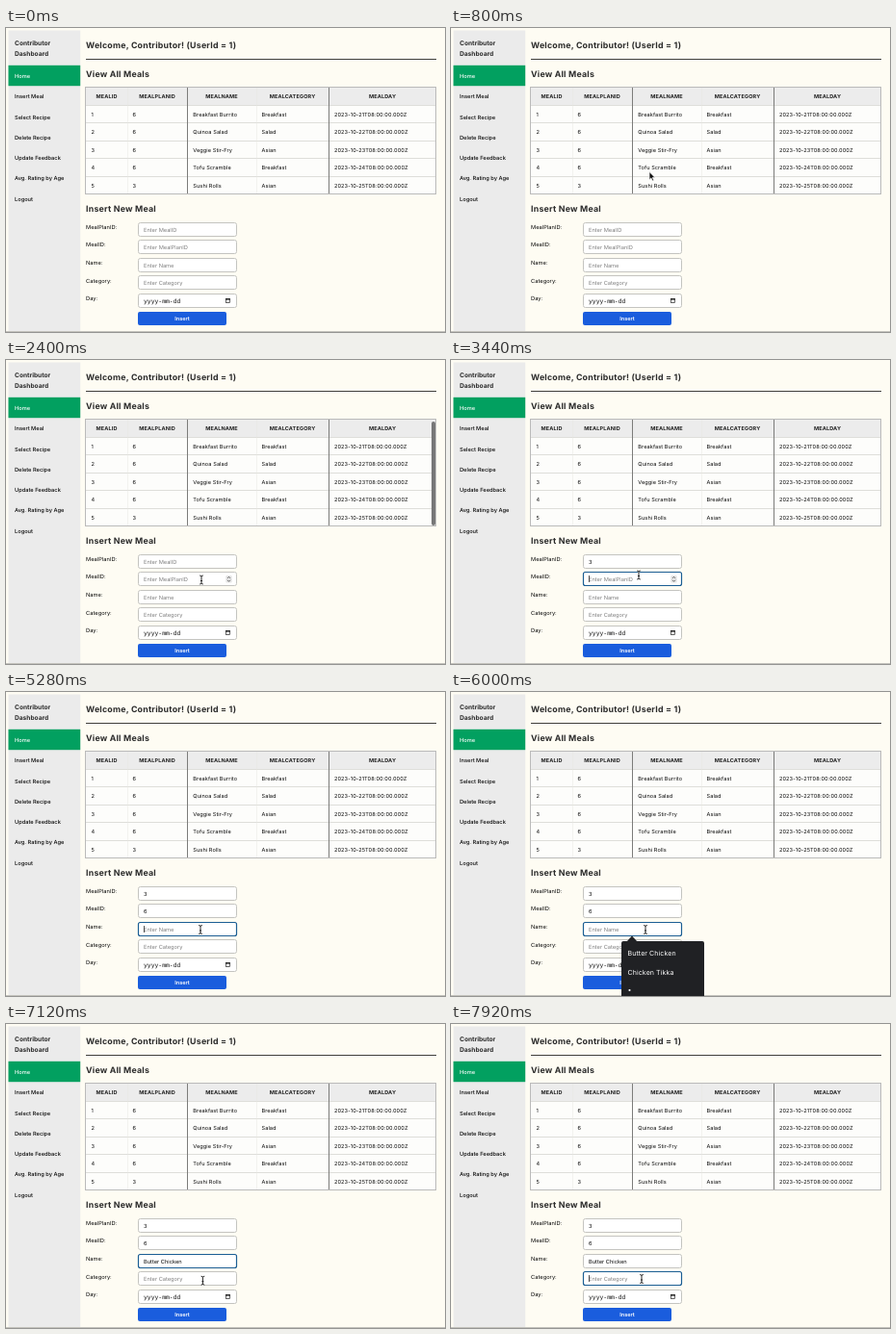
Write an HTML page that moves like this. It is 456x316 px and loops after 8 s.

```html
<!DOCTYPE html>
<html lang="en">
<head>
<meta charset="utf-8">
<title>Contributor Dashboard</title>
<style>
html, body { margin: 0; width: 100%; height: 100%; overflow: hidden; background: #fefcf3; }
svg { display: block; width: 456px; height: 316px; }
text { font: 500 5.7px Inter, "Open Sans", sans-serif; fill: #080808; text-rendering: geometricPrecision; white-space: pre; }
.h { font-size: 8.8px; font-weight: 700; letter-spacing: .22px; fill: #2b2b2b; }
.side { font-size: 6.6px; font-weight: 700; fill: #2b2b2b; }
.th { font-size: 5.5px; font-weight: 700; letter-spacing: .15px; text-anchor: middle; fill: #222; }
.td { font-size: 5.6px; font-weight: 400; letter-spacing: .08px; }
.label { font-weight: 400; letter-spacing: .04px; }
.value { font-weight: 400; }
.hint { font-weight: 400; fill: #808080; }
.date { font: 6.4px "Liberation Mono", monospace; }
.btn { font-size: 5.6px; font-weight: 600; fill: #fff; text-anchor: middle; }
.white { fill: #fff; }
.menu { font-size: 7px; font-weight: 400; letter-spacing: .1px; fill: #fff; }
</style>
</head>
<body>
<svg viewBox="0 0 456 316"><g id="page"></g><g id="live"></g></svg>
<script>
const LOOP = 8000, STEP = 80;
const FIELD = { x: 137.5, w: 102, h: 14, top: 202.1, pitch: 18.6 };
const RING = '#1b5e93';

const rect = (x, y, w, h, fill, extra = '') =>
  `<rect x="${x}" y="${y}" width="${w}" height="${h}" fill="${fill}" ${extra}/>`;
const text = (x, y, s, cls = '') => `<text x="${x}" y="${y}" class="${cls}">${s}</text>`;
const path = (d, extra) => `<path d="${d}" ${extra}/>`;
const fieldY = i => Math.floor(FIELD.top + i * FIELD.pitch) + .5;

function sidebar() {
  const items = ['Home', 'Insert Meal', 'Select Recipe', 'Delete Recipe',
    'Update Feedback', 'Avg. Rating by Age', 'Logout'];
  return rect(2.5, 2.5, 74.7, 313.5, '#ebebeb') + rect(2.5, 38.8, 74.7, 21.4, '#02a060') +
    text(9, 18, 'Contributor', 'side') + text(9, 29, 'Dashboard', 'side') +
    items.map((s, i) => text(9, 52 + i * 21.27, s, i ? '' : 'white')).join('');
}

function table() {
  const heads = [['MEALID', 104.5], ['MEALPLANID', 157], ['MEALNAME', 224],
    ['MEALCATEGORY', 297.5], ['MEALDAY', 391]];
  const meals = [['Breakfast Burrito', 'Breakfast', 6], ['Quinoa Salad', 'Salad', 6],
    ['Veggie Stir-Fry', 'Asian', 6], ['Tofu Scramble', 'Breakfast', 6], ['Sushi Rolls', 'Asian', 3]];
  let out = rect(83, 62, 364, 111, '#fdfdfb') + rect(83, 62, 364, 18, '#ececec');
  heads.forEach(([s, x]) => out += text(x, 73.2, s, 'th'));
  meals.forEach(([name, kind, plan], i) => {
    const y = 91.5 + i * 18.6;
    out += rect(83, Math.floor(80 + i * 18.6), 364, 1, '#dededa');
    const cells = [[88.5, i + 1], [131.5, plan], [194.3, name], [265.5, kind],
      [341, `2023-10-${21 + i}T08:00:00.000Z`]];
    cells.forEach(([x, s]) => out += text(x, y, s, 'td'));
  });
  [126, 260].forEach(x => out += rect(x, 62, .5, 111, '#e6e6e2'));
  [188, 335].forEach(x => out += rect(x, 62, 1, 111, '#7c7c7a'));
  return out + rect(82.5, 61.5, 364, 111, 'none', 'stroke="#bababa" stroke-width="1"');
}

function form() {
  let out = '';
  ['MealPlanID:', 'MealID:', 'Name:', 'Category:', 'Day:'].forEach((s, i) => {
    out += text(83, 208.9 + i * 18.55, s, 'label') +
      rect(FIELD.x, fieldY(i), FIELD.w, FIELD.h, '#fff', 'rx="2" stroke="#c4c4c0" stroke-width="1"');
  });
  const y = fieldY(4);
  return out + text(143, y + 9.1, 'yyyy-mm-dd', 'date') +
    rect(228.5, y + 5, 4, 4, 'none', 'stroke="#222" stroke-width=".7"') +
    rect(228.2, y + 4.7, 4.6, 1.4, '#222') +
    rect(137, 295, 92, 14, '#1a5ddd', 'rx="2"') + text(183, 304, 'Insert', 'btn');
}

function spinner(i) {
  const y = fieldY(i) + 3.4;
  return rect(228.3, y, 6.4, 7.6, '#e6e6e6', 'rx="1"') +
    path(`M230 ${y + 3}l1.5 -1.6 1.5 1.6M230 ${y + 4.8}l1.5 1.6 1.5 -1.6`,
      'fill="none" stroke="#444" stroke-width=".8"');
}

function menu(hover) {
  return path('M182 260l6 -6.5 6 6.5z', 'fill="#202124"') +
    rect(177, 259, 86, 60, '#202124', 'rx="2"') +
    (hover ? rect(177, 262, 86, 19, '#3a3b3d') : '') +
    text(183.5, 274, 'Butter Chicken', 'menu') + text(183.5, 294, 'Chicken Tikka', 'menu') +
    text(183.5, 312.2, '•', 'menu');
}

// time, x, y of the pointer's hot spot
const track = [[80, 450, 318], [800, 206, 149.5], [1040, 206, 149.5], [1440, 246, 122], [1840, 236, 146],
  [2400, 203, 228.5], [2720, 196, 210], [3200, 196, 210], [3360, 195, 223.5], [4880, 195, 223.5],
  [5200, 202, 247], [6000, 202, 247], [6400, 212, 270.5], [6720, 212, 270.5],
  [7440, 199, 264], [7600, 198, 265], [LOOP, 198, 265]];

function pointerAt(t) {
  const i = Math.max(1, track.findIndex(p => p[0] > t));
  const [t0, x0, y0] = track[i - 1], [t1, x1, y1] = track[i];
  const u = Math.max(0, (t - t0) / (t1 - t0)), e = u * u * (3 - 2 * u);
  return [x0 + (x1 - x0) * e, y0 + (y1 - y0) * e];
}

function fieldUnder(x, y) {
  const i = Math.floor((y - FIELD.top) / FIELD.pitch);
  const inside = x > FIELD.x && x < FIELD.x + FIELD.w && y - fieldY(i) < FIELD.h;
  return inside && i >= 0 && i < 5 ? i : -1;
}

function cursor(x, y, beam) {
  if (beam) {
    const d = `M${x - 1.8} ${y - 4.5}q1.8 0 1.8 1.3v6.4q0 1.3 -1.8 1.3M${x + 1.8} ${y - 4.5}` +
      `q-1.8 0 -1.8 1.3M${x + 1.8} ${y + 4.5}q-1.8 0 -1.8 -1.3M${x - 1} ${y + 1}h2`;
    return path(d, 'fill="none" stroke="#fff" stroke-width="1.8" opacity=".7"') +
      path(d, 'fill="none" stroke="#111" stroke-width=".9"');
  }
  return path(`M${x} ${y}v8.2l1.9 -1.8 1.3 3 1.4 -.6 -1.3 -2.9h2.6z`,
    'fill="#111" stroke="#fff" stroke-width=".7"');
}

function live(t) {
  const between = (a, b) => t >= a && t < b;
  const [x, y] = pointerAt(t);
  const open = between(5360, 6800), preview = between(6320, 6800);
  const focus = t < 2880 ? -1 : t < 3440 ? 0 : t < 5200 ? 1 : t < 7920 ? 2 : 3;
  const values = [t >= 3120 && '3', t >= 4480 && '6', t >= 6320 && 'Butter Chicken', ''];
  const hints = ['Enter MealID', 'Enter MealPlanID', 'Enter Name', 'Enter Category'];
  let out = '';

  if (between(1920, 2720)) {
    out += rect(442, 64, 4, 108, '#777', `rx="2" opacity="${t < 2640 ? 1 : .5}"`);
  }
  if (focus >= 0) {
    out += rect(FIELD.x, fieldY(focus), FIELD.w, FIELD.h, preview ? '#e3edfc' : '#fff',
      `rx="2" stroke="${RING}" stroke-width="1.2"`);
  }
  hints.forEach((hint, i) => {
    out += text(143, fieldY(i) + 9, values[i] || hint, values[i] ? 'value' : 'hint');
  });

  const blank = between(2880, 3120) || between(3440, 3920) || between(4400, 4480) ||
    between(5200, 5840) || t >= 7920;
  const typed = between(3120, 3440) || between(4480, 5040);
  if (blank || typed) out += rect(typed ? 147.3 : 143, fieldY(focus) + 3.5, .7, 7, '#111');

  const shown = t >= 80 && !between(4480, 4880);
  const over = open && y > 259 ? -1 : fieldUnder(x, y);
  if (shown && (over === 0 || over === 1)) out += spinner(over);
  if (open) out += menu(y > 262);
  if (shown) out += cursor(x, y, over >= 0);
  return out;
}

document.getElementById('page').innerHTML = rect(0, 0, 456, 316, '#fefcf3') + sidebar() +
  text(83, 20.8, 'Welcome, Contributor! (UserId = 1)', 'h') + rect(83, 32, 364, 1, '#3f3f3d') +
  text(83, 50.7, 'View All Meals', 'h') + table() +
  text(83, 190.7, 'Insert New Meal', 'h') + form() + rect(0, 315, 456, 1, '#c4c3bd');

const layer = document.getElementById('live');
let last = -1;
function tick() {
  const t = Math.floor((performance.now() % LOOP) / STEP) * STEP;
  if (t !== last) {
    layer.innerHTML = live(t);
    last = t;
  }
  requestAnimationFrame(tick);
}
tick();
</script>
</body>
</html>
```
